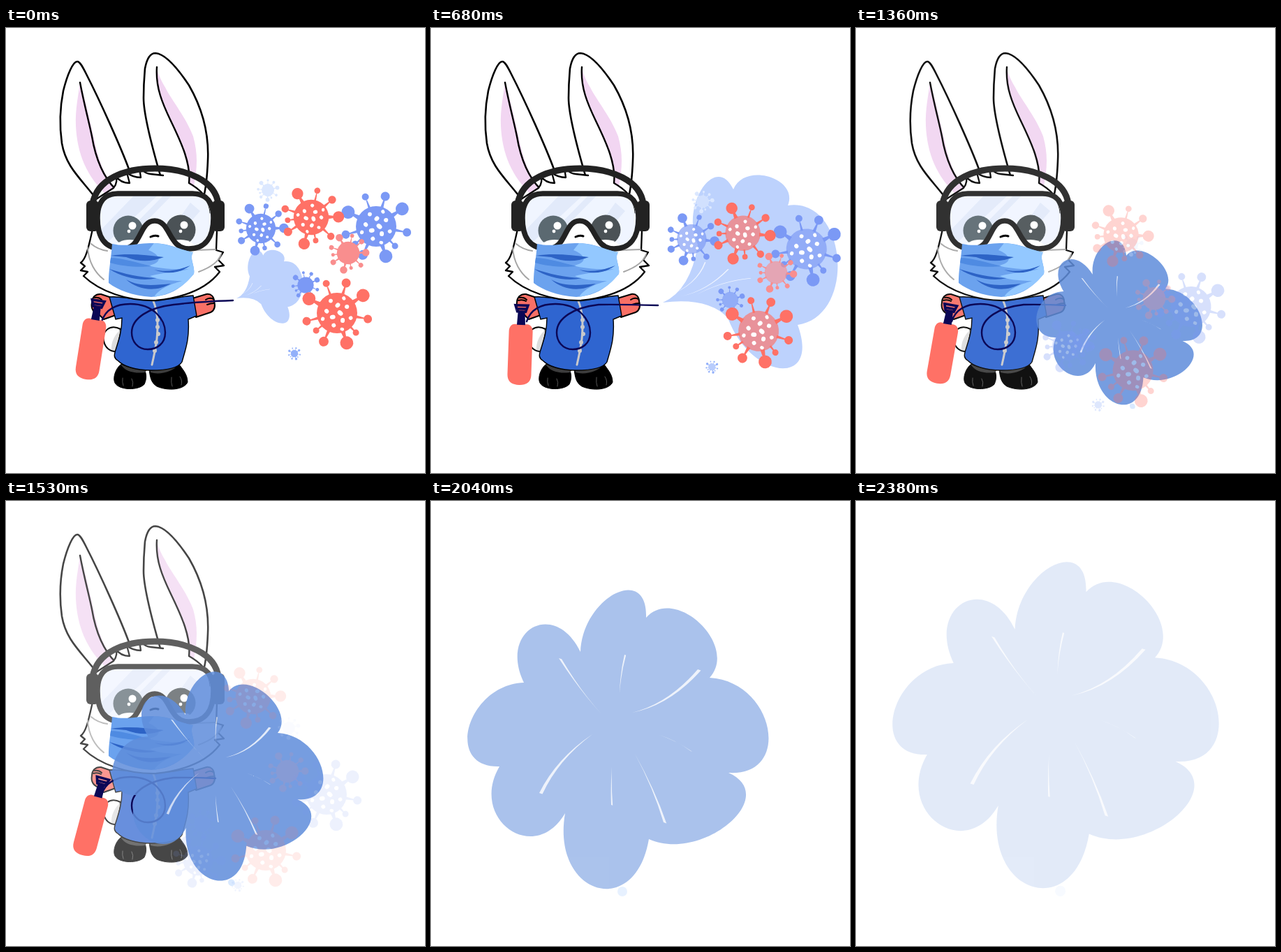
An HTML page that plays this animation: 600x637 px, repeating every 2550 ms.

```html
<!DOCTYPE html>
<html>
<head>
<meta charset="utf-8">
<style>
html, body { margin: 0; height: 100%; overflow: hidden; background: #fff }
svg { display: block; width: 100%; height: 100% }
.line { fill: none; stroke-linecap: round; stroke-linejoin: round }
</style>
</head>
<body>
<svg viewBox="0 0 600 637">
<defs>
  <path id="lens" d="M160 237H267C288 237 297 250 297 272C297 300 285 316 262 316C232 316 236 276 213 276C190 276 195 316 167 316C140 316 131 298 131 272C131 250 140 237 160 237Z"/>
  <clipPath id="inside"><use href="#lens"/></clipPath>
</defs>

<g id="bunny">
  <!-- ears -->
  <g stroke="#000" stroke-width="2.6" fill="#fff" stroke-linejoin="round">
    <path d="M131 247C108 216 86 200 80 165C75 130 80 100 82 90C88 66 96 48 102 48C106 48 110 56 115 66C135 105 165 172 176 202"/>
    <path d="M221 211C212 180 197 125 197 100C197 80 198 70 199 58C202 42 208 36 214 36C230 37 250 64 262 82C281 115 291 150 289 190C288 215 286 230 283 242"/>
  </g>
  <g fill="#f2d6f2">
    <path d="M106 78C104 95 99 115 100 140C102 180 115 212 145 240L156 230C135 205 130 175 123 145C116 112 110 92 106 78"/>
    <path d="M216 56C214 82 222 105 236 132C253 165 265 195 262 222L269 226C274 200 275 180 268 155C256 125 235 100 228 85C220 72 217 62 216 56"/>
  </g>
  <g class="line" stroke="#000" stroke-width="2.4">
    <path d="M106 78C112 110 119 135 123 155C128 185 138 212 157 231"/>
    <path d="M216 56C214 85 224 108 236 133C252 166 265 195 262 222"/>
  </g>

  <!-- feet -->
  <g stroke="#000">
    <path d="M170 478C158 483 152 500 156 508C162 519 190 519 198 510C203 500 200 490 196 486Z"/>
    <path d="M205 487C206 500 208 508 216 513C232 520 255 518 260 507C260 495 252 488 247 480Z"/>
  </g>
  <path d="M164 481C178 489 190 487 202 489L199 493C185 495 170 492 164 481M206 488C220 488 235 488 246 482C240 492 220 497 207 493" fill="#3c3c3c"/>
  <path class="line" stroke="#555" d="M167 501q-1 6 1 11M180 502q3 5 1 11M237 500q-1 8 1 13M249 499q4 6 2 12"/>

  <!-- tail, gloves, coat -->
  <path d="M164 431C149 423 137 434 140 448C142 458 149 463 157 463Z" fill="#fff" stroke="#000" stroke-width="2"/>
  <path d="M164 432C156 438 150 450 151 461L158 461Z" fill="#ddd"/>
  <g fill="#f97066" stroke="#000" stroke-width="2" stroke-linejoin="round">
    <path d="M151 386L136 381C128 380 123 386 123 393C121 402 126 408 133 410L140 417L157 411Z"/>
    <path d="M267 387L287 381C294 380 298 385 298 391C300 398 299 404 293 407L272 414Z"/>
    <path class="line" d="M125 390q6-2 11 1M127 386q6-1 10 3M286 389q5-4 11-1M288 396q5-2 10-2"/>
  </g>
  <path d="M148 385C165 383 180 390 215 389C240 389 255 383 268 383L273 412L261 417C263 445 257 460 252 478C246 488 225 490 208 490C185 490 168 484 160 476C154 472 155 468 156 464C161 448 166 435 166 415L157 417Z" fill="#2f65d0" stroke="#000" stroke-width="1.4"/>
  <path class="line" stroke="#c9c9cb" stroke-width="3" d="M211 391C217 405 218 425 216 445C214 462 212 468 209 482"/>
  <path class="line" stroke="#c9c9cb" stroke-width="6" d="M217 418v0M217 428v0M218 438v0M215 450v0M213 462v0"/>

  <!-- head -->
  <path d="M126 247L154 229C159 223 159 216 157 212C162 219 170 222 177 222L173 207C179 212 186 214 193 214L191 200C197 206 203 209 207 209L225 211L262 222C280 232 291 245 296 262L302 290L301 318L311 321L304 332L312 340L299 342L306 349C290 370 262 385 215 390C175 391 135 378 111 355L117 349L107 347L113 341L107 336C115 331 119 310 124 288Z" fill="#fff"/>
  <path class="line" stroke="#000" stroke-width="2.3" d="M126 247L154 229C159 223 159 216 157 212C162 219 170 222 177 222L173 207C179 212 186 214 193 214L191 200C197 206 203 209 207 209L225 211M262 222C280 232 291 245 296 262M302 290L301 318L311 321L304 332L312 340L299 342L306 349C290 370 262 385 215 390C175 391 135 378 111 355L117 349L107 347L113 341L107 336C115 331 119 310 124 288"/>
  <path class="line" stroke="#a6a6a6" stroke-width="2" d="M122 309C130 316 138 318 145 319M117 314C118 335 128 351 140 360M272 318L300 317M276 349C295 342 305 333 308 324"/>

  <!-- goggles -->
  <use href="#lens" fill="#f0f5ff"/>
  <g clip-path="url(#inside)">
    <path d="M186 237H220L143 309L131 294ZM228 237H240L178 300L166 300ZM264 250L278 262L240 305H225Z" fill="#e2eafa"/>
    <circle cx="175" cy="290" r="21.5" fill="#5b6971"/><circle cx="250" cy="289" r="21.5" fill="#4b5256"/>
    <g fill="#fff">
      <circle cx="181" cy="283" r="5.5"/><circle cx="176" cy="291" r="2.4"/>
      <circle cx="255" cy="282" r="5.5"/><circle cx="250" cy="291" r="2.4"/>
      <ellipse cx="177" cy="314" rx="20" ry="11"/><ellipse cx="250" cy="314" rx="20" ry="11"/>
    </g>
    <path class="line" stroke="#333" d="M284 242Q292 255 292 265"/>
  </g>
  <use href="#lens" fill="none" stroke="#222" stroke-width="7.5"/>
  <path class="line" stroke="#222" stroke-width="9" d="M124 252C130 216 170 201 213 201C258 201 300 218 304 252"/>
  <g fill="#222"><rect x="115" y="247" width="18" height="44" rx="6"/><rect x="295" y="247" width="18" height="44" rx="6"/></g>
</g>

<g id="gear">
  <path class="line" stroke="#000" stroke-width="3" d="M207 299q6-3 11-1"/>
  <path d="M152 309C175 314 190 307 210 308C235 308 250 318 268 321C262 330 271 340 269 352C250 374 235 383 208 385C180 383 160 375 147 365C147 345 150 335 152 309Z" fill="#6ba2ee"/>
  <path d="M212 308C235 309 250 318 268 321C262 330 271 340 269 352C255 370 238 380 212 385C222 370 240 366 252 362C235 362 215 360 206 355C225 350 250 349 262 345C240 346 215 344 205 340C230 334 215 322 204 318Z" fill="#93c8ff"/>
  <path d="M150 326C175 322 200 325 226 328C208 335 190 335 172 328C165 327 158 327 150 326M148 345C170 352 190 357 216 358C195 363 168 358 148 345M172 360C190 371 215 368 236 366C215 378 190 376 172 360M212 346C230 350 245 347 264 340C246 353 228 352 212 346" fill="#2d63c6"/>
  <path d="M150 329C170 330 188 336 208 341C190 343 165 341 149 336Z" fill="#4f8be2"/>
  <path id="hose" class="line" stroke="#0b0756" stroke-width="2.4"/>
  <g id="can">
    <path d="M-9 0H9C14 0 17 5 17 10V72C17 83 10 87 0 87C-10 87-17 83-17 72V10C-17 5-14 0-9 0Z" fill="#ff7166"/>
    <path d="M-6 1L-5-17H5L6 1Z" fill="#0b0756"/>
    <path d="M-9-27H9L6-18H-6ZM-9-22H8" fill="none" stroke="#0b0756" stroke-width="3.6"/>
  </g>
</g>

<g id="puff" fill="#bdd2fd"></g>
<g id="cloud" fill="#bdd2fd"></g>
<g id="flower" fill="#5f8ddb"></g>
<g id="germs"></g>
</svg>

<script>
const STEP = 170, LOOP = 2550;
const $ = id => document.getElementById(id);
const set = (el, attrs) => { for (const k in attrs) el.setAttribute(k, attrs[k]); };
const points = s => s.trim().split(/\s+/).map(p => p.split(',').map(Number));

// value at time t between keys [time, ...values]
function at(keys, t) {
  const j = keys.findIndex(k => k[0] > t);
  if (j <= 0) return keys.at(j).slice(1);
  const [a, ...p] = keys[j - 1], [b, ...q] = keys[j];
  return p.map((v, i) => v + (q[i] - v) * (t - a) / (b - a));
}

// one round lobe per notch, tip, notch: the curve's middle lies on the tip
function lobes(pts) {
  let d = '';
  for (let i = 0; i + 2 < pts.length; i += 2) {
    const [[ax, ay], [tx, ty], [bx, by]] = pts.slice(i, i + 3);
    const dx = (tx - (ax + bx) / 2) * 4 / 3, dy = (ty - (ay + by) / 2) * 4 / 3;
    d += `C${ax + dx} ${ay + dy} ${bx + dx} ${by + dy} ${bx} ${by}`;
  }
  return d;
}

// tapering streak per inner end, bend, outer end
function veins(pts, width) {
  let d = '';
  for (let i = 0; i < pts.length; i += 3) {
    const [[x, y], [cx, cy], [ex, ey]] = pts.slice(i, i + 3);
    const w = width * Math.hypot(ex - x, ey - y) / 100;
    d += `M${x} ${y}Q${cx} ${cy} ${ex} ${ey}l${w} ${w / 3}Q${cx + w / 2} ${cy + w / 2} ${x} ${y}Z`;
  }
  return d;
}
const fill = (id, shape, streaks, width, extra = '') =>
  $(id).innerHTML = `<path d="${shape}Z"/><path d="${veins(points(streaks), width)}" fill="#fff" opacity=".8"/>` + extra;

// puff starts at its nozzle, which is the origin
fill('puff', 'M0 0Q40-18 50-83' + lobes(points('50,-83 56,-163 101,-162 152,-180 179,-139 250,-63 193,32 168,94 93,22')) + 'Q65-8 0 0',
  '6,-9 48,-25 60,-58 26,-9 63,-17 93,-48 48,-11 83,-31 125,-35', 2);
fill('cloud', 'M298 397Q355 390 400 348' + lobes(points(
  '400,348 432,332 462,330 508,334 521,383 557,432 521,474 512,515 455,523 404,558 366,521 344,512 343,460')) + 'Q340 410 298 397',
  '355,403 395,398 425,365 380,405 410,395 437,396', 2);
fill('flower', 'M98 380' + lobes(points(
  '98,380 55,322 133,260 146,181 214,216 263,133 308,167 385,175 399,253 482,325 426,389 426,462 312,484 237,553 192,447 112,470 98,380')),
  `245,306 212,270 183,225 270,275 271,245 277,220 288,303 340,290 382,241 327,335 350,342 372,358
   292,362 318,410 333,460 259,380 257,408 258,435 231,334 180,368 155,418`, 4,
  '<circle cx="274" cy="559" r="7" fill="#d3e6ff"/>');

// a germ is a ball of radius 29 with ten knobs around it and spots in a spiral
const knobs = points('-110,5 -73,6.5 -34,9.3 11,6 46,4.5 72,9.4 115,7 140,4.5 165,6 207,9.4');
function germShape(color, spots) {
  let s = '';
  for (const [deg, r] of knobs) s += `<g transform="rotate(${deg})" fill="${color}">
    <path d="M27 ${-r * .35}L40 ${-r * .15}V${r * .15}L27 ${r * .35}Z"/><circle cx="${r > 4.5 ? 45 : 39}" r="${r}"/></g>`;
  s += `<circle class="ball" r="29" fill="${color}"/>`;
  for (let i = 0; i < spots; i++) {
    const far = 7.2 * Math.sqrt(i + .4);
    s += `<ellipse cx="${far}" rx="${4.8 - far * .1}" ry="${3.3 - far * .02}" fill="#fff" transform="rotate(${i * 137.5})rotate(40 ${far} 0)"/>`;
  }
  return s;
}

const RED = '#ff7166', BLUE = '#7b99f5';
// color, scale, turn, spots, start, end
const germs = [
  ['#dce8ff', .31, 20, 0, 375, 232, 405, 325],
  [BLUE, .73, 33, 12, 365, 287, 275, 515],
  [BLUE, 1, 0, 12, 530, 284, 459, 420],
  [RED, .87, 33, 12, 437, 271, 354, 280],
  ['#f98e8e', .56, 33, 0, 490, 322, 403, 387],
  [BLUE, .4, 10, 0, 429, 368, 281, 462],
  [RED, 1, 0, 12, 474, 408, 372, 500],
  ['#92b0fa', .18, 0, 0, 413, 466, 332, 550]
].map(([color, scale, turn, spots, x, y, endX, endY]) => {
  const el = document.createElementNS('http://www.w3.org/2000/svg', 'g');
  el.innerHTML = germShape(color, spots);
  $('germs').append(el);
  return { el, scale, turn, x, y, endX, endY, ball: el.querySelector('.ball') };
});

// the germs swing together about PIVOT, then scatter
const PIVOT = [490, 322];
const swing = [[0, 0, 0, 0], [340, 0, 2, .7], [680, 4, 28, 6], [850, 16, 60, 9], [1020, -15, 66, 9]];
const scatter = [[1020, 0], [1530, 1]];
const germFade = [[680, 1], [1020, .62], [1530, .13], [1700, 0]];
const ballFade = [[340, 1], [510, .8], [680, .65], [1020, 1]];

const bunnyFade = [[1190, 1], [1360, .93], [1530, .72], [2040, 0]];
const gearFade = [[1530, 1], [2040, 0]];
const canPose = [[0, 128, 417, 9], [340, 127, 422, 7], [680, 129, 424, 2], [1020, 129, 423, 0], [1530, 132, 423, 15]];
const hoseEnd = [[0, 325, 390], [340, 325, 389], [680, 325, 397], [1020, 300, 397]];
const puffPose = [[0, 330, 387, .38], [340, 335, 386, .73], [680, 332, 393, 1]];
const flowerPose = [[1360, .55, .07, .55, 206, 234], [1530, .7, .07, .7, 92, 155], [1870, .95, .02, .95, 5, 20],
  [2040, 1, 0, 1, 0, 0], [2380, 1.084, 0, 1.092, -4.4, -52]];
const flowerFade = [[1530, .85], [2040, .525], [2380, .175]];

function draw(t) {
  set($('bunny'), { opacity: at(bunnyFade, t) });
  set($('gear'), { opacity: at(gearFade, t) });

  const [x, y, turn] = at(canPose, t), [hx, hy] = at(hoseEnd, t);
  set($('can'), { transform: `translate(${x} ${y})rotate(${turn})` });
  set($('hose'), { d: `M137 420C142 405 155 395 178 395C212 395 228 418 228 436C228 452 216 460 203 460C188 460 180 448 180 436C180 415 205 400 240 396Q270 ${(394 + hy) / 2} ${hx} ${hy}` });

  const [px, py, size] = at(puffPose, t), [a, c, d, e, f] = at(flowerPose, t);
  const stage = t < 850 ? 'puff' : t < 1360 ? 'cloud' : 'flower';
  for (const id of ['puff', 'cloud', 'flower']) set($(id), { display: id === stage ? 'inline' : 'none' });
  set($('puff'), { transform: `translate(${px} ${py})scale(${size})` });
  set($('cloud'), { transform: t < 1020 ? 'translate(34 -8)' : '' });
  set($('flower'), { transform: `matrix(${a} 0 ${c} ${d} ${e} ${f})`, opacity: at(flowerFade, t) });

  const [dx, dy, deg] = at(swing, t), [go] = at(scatter, t), rad = deg * Math.PI / 180;
  for (const g of germs) {
    const rx = g.x - PIVOT[0], ry = g.y - PIVOT[1];
    const gx = PIVOT[0] + dx + rx * Math.cos(rad) - ry * Math.sin(rad);
    const gy = PIVOT[1] + dy + rx * Math.sin(rad) + ry * Math.cos(rad);
    set(g.el, {
      transform: `translate(${gx + (g.endX - gx) * go} ${gy + (g.endY - gy) * go})rotate(${g.turn + deg * (1 - go)})scale(${g.scale})`,
      opacity: at(germFade, t)
    });
    set(g.ball, { opacity: at(ballFade, t) });
  }
}

function tick(now) {
  draw(Math.floor(now % LOOP / STEP) * STEP);
  requestAnimationFrame(tick);
}
draw(0);
requestAnimationFrame(tick);
</script>
</body>
</html>
```
